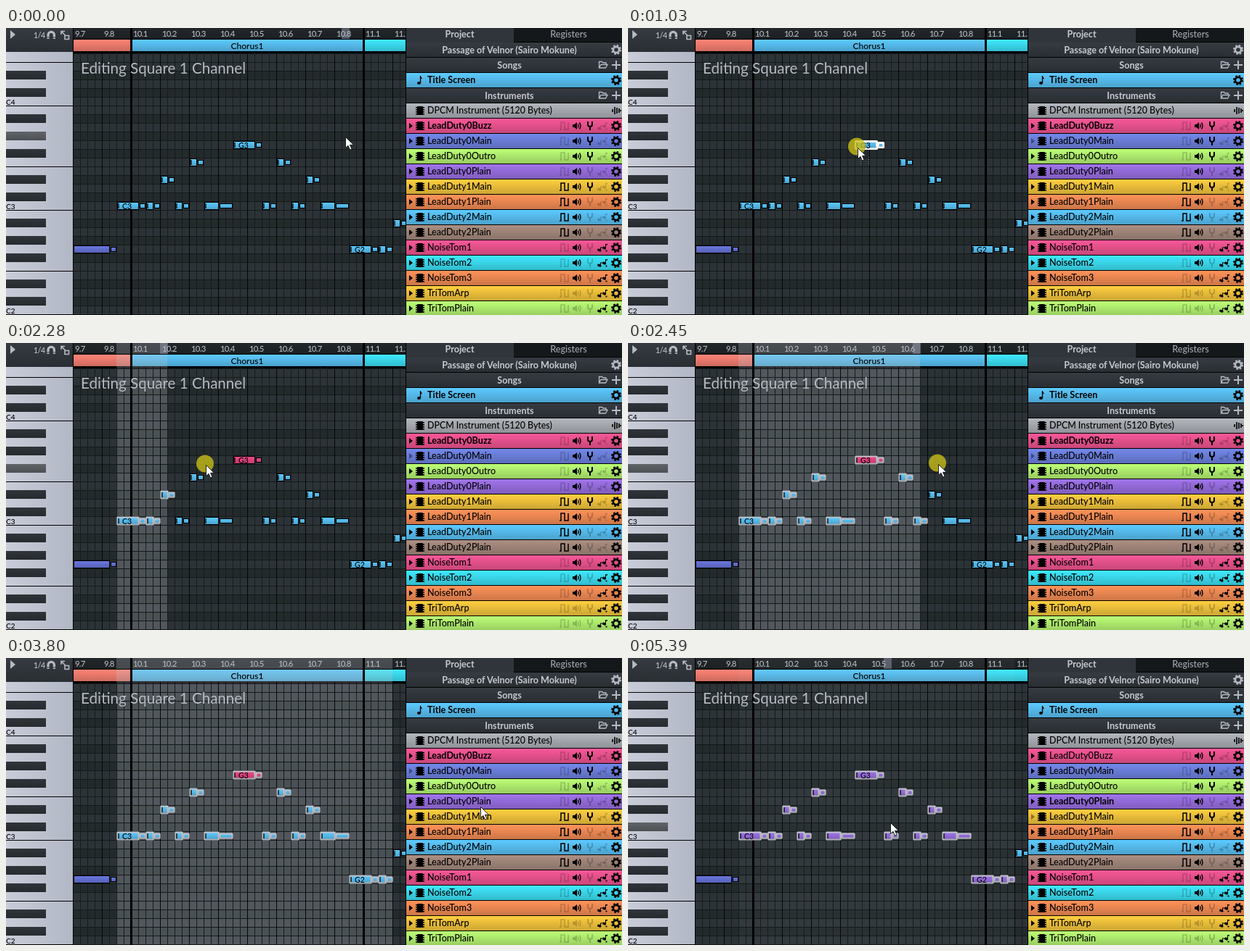
Write an HTML page that moves like this. It is 848 by 396 pixels and loops after 5.47 s.

```html
<!DOCTYPE html>
<html lang="en">
<head>
<meta charset="utf-8">
<title>Piano roll instrument drag</title>
<style>
  html, body { margin: 0; width: 100%; height: 100%; overflow: hidden; background: #000; }
  svg { display: block; width: 100vw; height: 100vh; }
  text { font-family: Lato, "Open Sans", sans-serif; font-weight: 500; white-space: pre; }
</style>
</head>
<body>
<svg viewBox="0 0 848 396" xmlns="http://www.w3.org/2000/svg">
  <defs>
    <linearGradient id="shade" x2="0" y2="1"><stop stop-opacity="0"/><stop offset="1" stop-opacity=".2"/></linearGradient>
    <linearGradient id="ivory"><stop stop-color="#c8ccd8"/><stop offset="1" stop-color="#b2b7c5"/></linearGradient>
    <linearGradient id="panel" x2="0" y2="1"><stop stop-color="#363b42"/><stop offset="1" stop-color="#292e33"/></linearGradient>
  </defs>
  <g id="base"></g>
  <g id="under"></g>
  <g id="lines"></g>
  <g id="notes"></g>
  <g id="side"></g>
  <g id="pointer"></g>
</svg>
<script>
const LOOP = 5470, CELL = 10, ROW = 12, LEFT = 92, RIGHT = 550, C3 = 239;
const PINK = '#f95898', INDIGO = '#7388ea', GREEN = '#bdff77', PURPLE = '#a074ec', YELLOW = '#ffcf40',
      ORANGE = '#ff9359', SKY = '#5dcaff', BROWN = '#ac8f82', CYAN = '#3feaff';

const layer = (id, html) => { document.getElementById(id).innerHTML = html; };
const rect = (x, y, w, h, fill, more = '') => `<rect x="${x}" y="${y}" width="${w}" height="${h}" fill="${fill}" ${more}/>`;
const text = (x, y, size, str, fill = '#000', more = '') => `<text x="${x}" y="${y}" font-size="${size}" fill="${fill}" ${more}>${str}</text>`;
const path = (d, fill, more = '') => `<path d="${d}" fill="${fill}" ${more}/>`;
const stroke = (d, color, width) => path(d, 'none', `stroke="${color}" stroke-width="${width}"`);
const at = (x, y, html, alpha = 1) => `<g transform="translate(${x} ${y})" opacity="${alpha}">${html}</g>`;
const shaded = (x, y, w, h, fill) => rect(x, y, w, h, fill) + rect(x, y, w, h, 'url(#shade)');
const range = (a, b, fn) => Array.from({ length: b - a }, (_, i) => fn(a + i)).join('');

// Semitones are counted from C3.
const pitchTop = s => C3 - s * ROW;
const isBlack = s => [1, 3, 6, 8, 10].includes(((s % 12) + 12) % 12);
const pitchAt = y => -Math.floor((y - C3) / ROW);

// Piano roll

function drawBase() {
  let s = rect(0, 0, 848, 396, '#000');
  s += rect(LEFT, 0, 460, 15, '#22272a') + rect(LEFT, 0, 460, 15, 'url(#shade)');
  s += shaded(93, 16, 79, 16, '#ff8476') + shaded(173, 16, 319, 16, SKY) + shaded(493, 16, 58, 16, CYAN);
  s += range(-13, 18, p => rect(LEFT, pitchTop(p), 460, ROW, isBlack(p) ? '#232a2c' : '#2c3337'));
  s += rect(LEFT, 32, 460, 1, '#000') + rect(0, 33, LEFT, 363, 'url(#ivory)');
  layer('base', s);
}

function drawLines() {
  let s = range(-13, 18, p => isBlack(p) ? shaded(0, pitchTop(p), 55, ROW, '#30353a') : '');
  for (const y of [47, 107, 191, 251, 335, 395]) s += rect(0, y, LEFT, 1, '#000');
  [['C4', 106], ['C3', 250], ['C2', 394]].forEach(([n, y]) => s += text(0, y, 10, n));
  s += range(-13, 18, p => rect(LEFT, pitchTop(p), 460, 1, '#14191b'));
  s += range(0, 46, i => rect(LEFT + i * CELL, 33, 1, 363, i % 4 ? '#171c1e' : '#050708'));
  s += rect(LEFT, 0, 1, 396, '#000') + rect(LEFT, 15, 460, 1, '#000');
  s += rect(171, 0, 3, 396, '#000') + rect(491, 0, 3, 396, '#000');
  const beats = ['9.7', '9.8', ...Array.from({ length: 8 }, (_, i) => '10.' + (i + 1)), '11.1', '11.2'];
  beats.forEach((b, i) => s += text(95 + i * 40, 12, 11.4, b, '#b6bac2', 'letter-spacing="-.75"'));
  s += text(332, 29, 12, 'Chorus1', '#000', 'text-anchor="middle"');
  s += text(103, 63, 20.6, 'Editing Square 1 Channel', '#b6bac2', 'font-weight="400" style="font-weight:400"');

  s += rect(0, 0, LEFT, 33, 'url(#panel)');
  s += path('M6 3L13 9L6 15Z', '#b6bac2') + text(38, 14, 10.5, '1/4', '#c0c4ca', 'letter-spacing="-.4"');
  s += stroke('M58 15V9.5a4.2 4.2 0 0 1 8.4 0V15', '#b6bac2', 3.2) + rect(56, 12.4, 12, 1, '#30353a');
  s += stroke('M76 9V4.500H81M76.500 5L82 10.500M81 10.500H86.500V15.500H81Z', '#b6bac2', 1.6);
  layer('lines', s);
}

// x, body width, release width, semitone, label
const NOTES = [
  [93, 50, 10, -5], [153, 30, 10, 0, 'C3'], [193, 10, 10, 0], [213, 10, 10, 3], [233, 10, 10, 0],
  [253, 10, 10, 5], [273, 20, 20, 0], [313, 30, 10, 7, 'G3'], [353, 10, 10, 0], [373, 10, 10, 5],
  [393, 10, 10, 0], [413, 10, 10, 3], [433, 20, 20, 0], [473, 30, 10, -5, 'G2'], [513, 10, 10, -5], [533, 10, 10, -2]
];

function note([x, w, rel, pitch, label], color, edge, thick) {
  const y = pitchTop(pitch) + 1, rx = x + w + 1, rw = rel - 2;
  const line = edge ? `stroke="${edge}" stroke-width="${thick}" stroke-linejoin="round"` : 'stroke="#000"';
  const box = (bx, by, bw, bh) => rect(bx, by, bw, bh, color, line) + rect(bx, by, bw, bh, 'url(#shade)');
  let s = box(rx + .5, y + 2.5, rw - 1, 6) + box(x + .5, y + .5, w - 1, 10);
  if (x > 100) s += rect(x + 1, y + 2, 2, 7, '#000', 'opacity=".65"');
  return s + (label ? text(x + 7, y + 9.5, 10.5, label) : '');
}

// Side panel

const gear = c => `<circle r="4.1" fill="none" stroke="${c}" stroke-width="2.6"/>
  <circle r="5.7" fill="none" stroke="${c}" stroke-width="2.600" stroke-dasharray="2.4 2.077"/>`;
const plus = stroke('M-6 0H6M0 -6V6', '#b6bac2', 2);
const folder = stroke('M-5.500 4V-4.500H-1.500L0 -3H4V-.500M-5.500 4L-3 -.500H6L3.500 4Z', '#b6bac2', 1.3);
const chip = rect(-4, -6, 8, 12, '#000', 'rx="1"') + range(0, 4, i => rect(-6, -5 + i * 3, 12, 1.6, '#000'));
const ICONS = [
  [768, stroke('M-6 5H-4V-5H1V5H6V-5', '#000', 1.5)],
  [786, path('M-6 -2H-3.500L0 -5V5L-3.500 2H-6Z', '#000') + stroke('M1.500 -2.500Q3 0 1.500 2.500M3.500 -4.500Q6.500 0 3.500 4.500', '#000', 1.4)],
  [804, stroke('M-3 -6V-2Q-3 1 0 1Q3 1 3 -2V-6M0 1V6', '#000', 2)],
  [822, path('M-6 5a2 1.700 0 1 1 2 -1.500V-.500H-1V.500H-3V4ZM1 2a2 1.700 0 1 1 2 -1.500V-5H6V-3.500H4V1Z', '#000')
        + `<circle cx="-4.200" cy="4" r="1.8"/><circle cx="2.300" cy="1" r="1.8"/><circle cx="4.500" cy="4.500" r="1.1"/>`]
];
// name, colour, which of the four icons are lit
const INSTRUMENTS = [
  ['LeadDuty0Buzz', PINK, '0110'], ['LeadDuty0Main', INDIGO, '0110'], ['LeadDuty0Outro', GREEN, '0110'],
  ['LeadDuty0Plain', PURPLE, '0100'], ['LeadDuty1Main', YELLOW, '1110'], ['LeadDuty1Plain', ORANGE, '1100'],
  ['LeadDuty2Main', SKY, '1100'], ['LeadDuty2Plain', BROWN, '1100'], ['NoiseTom1', PINK, '0101'],
  ['NoiseTom2', CYAN, '0101'], ['NoiseTom3', ORANGE, '0101'], ['TriTomArp', YELLOW, '0001'], ['TriTomPlain', GREEN, '0001']
];

function drawSide(chosen, faded) {
  const bold = 'style="font-weight:700"', mid = 'text-anchor="middle"', grey = '#c6cad0';
  const head = (y, str) => rect(551, y, 297, 20, 'url(#panel)') + text(693, y + 14.5, 12.6, str, grey, `${mid} ${bold}`);
  let s = rect(550, 0, 298, 396, '#000') + rect(551, 0, 148, 20, '#30353b') + rect(699, 0, 149, 19, '#14181b');
  s += text(624.5, 13, 12.6, 'Project', grey, `${mid} ${bold}`) + text(774.5, 13, 12.6, 'Registers', '#a4a8b0', mid);
  s += head(20, 'Passage of Velnor (Sairo Mokune)') + at(840, 30, gear('#b6bac2'));
  s += head(41, 'Songs') + head(83, 'Instruments');
  for (const y of [51, 93]) s += at(822, y, folder) + at(840, y, plus);
  s += shaded(551, 62, 297, 20, SKY) + text(580, 76.3, 12.6, 'Title Screen', '#000', bold);
  s += at(570, 72, '<ellipse cx="-1.500" cy="4" rx="2.500" ry="2"/>' + stroke('M.5 4V-6Q1 -3 2.500 -2', '#000', 1.3)) + at(840, 72, gear('#000'));
  s += shaded(551, 104, 297, 20, '#b3b7be') + at(570, 114, chip) + text(580, 118.3, 12.4, 'DPCM Instrument (5120 Bytes)');
  s += at(840, 114, stroke('M-5 -2V2M-2 -5V5M1 -4V4M4 -3V3M6 -1V1', '#000', 1.6));
  INSTRUMENTS.forEach(([name, color, lit], i) => {
    const y = 125 + i * 21, c = y + 10;
    s += shaded(551, y, 297, 20, color) + at(557, c, path('M-2 -4L3 0L-2 4Z', '#000'), i === faded ? .4 : 1);
    s += at(570, c, chip) + text(580, y + 14.3, 12.6, name, '#000', i === chosen ? bold : '');
    ICONS.forEach(([x, icon], k) => s += at(x, c, icon, +lit[k] ? 1 : .2));
    s += at(840, c, gear('#000'));
  });
  layer('side', s);
}

// Pointer motion

const MOVE = 0, DRAG = 1, SELECT = 2, DROP = 3, REST = 4;
const smooth = p => p * p * (3 - 2 * p);
const flick = p => 1 - (1 - p) ** 2.75;
const even = p => p;
// start, end, steps, from x y, to x y, mode, easing
const MOTION = [
  [0, 0, 1, 467, 150, 467, 150, MOVE, even],
  [70, 540, 7, 467, 150, 607, 136, MOVE, smooth],
  [630, 1030, 6, 607, 136, 316, 165, DRAG, smooth],
  [1260, 1740, 7, 316, 165, 153, 165, MOVE, smooth],
  [1820, 2130, 5, 153, 165, 156, 168, MOVE, even],
  [2280, 2770, 7, 156, 169.5, 501, 166.5, SELECT, flick],
  [2850, 3010, 3, 501, 166, 525, 163, SELECT, even],
  [3320, 3800, 7, 525, 163, 653, 205, MOVE, smooth],
  [3880, 4370, 7, 651, 200, 361, 229, DRAG, smooth],
  [4460, 4460, 1, 361, 229, 361, 229, DROP, even],
  [4540, 4540, 1, 361, 229, 361, 229, REST, even],
  [4760, 4840, 2, 361, 229, 361, 229, MOVE, even],
  [5390, 5390, 1, 361, 229, 361, 227, MOVE, even]
];

function pointerAt(t) {
  const i = MOTION.findLastIndex(m => t >= m[0]);
  const [a, b, n, x0, y0, x1, y1, mode, ease] = MOTION[i];
  const step = n > 1 ? Math.min(n - 1, Math.floor((t - a + 6) / (b - a) * (n - 1))) : 0;
  const place = k => { const p = ease(k / n); return [x0 + (x1 - x0) * p, y0 + (y1 - y0) * p]; };
  const [x, y] = place(step + 1), [px, py] = place(step);
  // The editor trails slightly behind the pointer.
  return { key: i + ':' + step, x, y, mode, ux: px + (x - px) * .55, uy: mode === SELECT ? py + (y - py) * .55 : y };
}

const cellAt = x => LEFT + Math.floor((x - LEFT) / CELL) * CELL;

function render(t, p) {
  const hover = (p.mode === MOVE || p.mode === SELECT) && p.x < RIGHT && p.x > LEFT;
  const cellX = p.mode === SELECT ? (t >= 3010 ? p.x : p.ux) : p.x;
  const end = t < 2280 ? 0 : t >= 3010 ? 532 : cellAt(cellX) + CELL;
  const key = pitchAt(p.uy), top = pitchTop(key);

  let under = '';
  if (end) under += rect(152, 0, end - 152, 396, '#c0c4cc', `opacity="${t < 3880 ? .25 : .045}"`);
  if (hover) {
    under += rect(cellAt(cellX), 0, CELL + 1, 15, '#aab2c8', 'opacity=".4"');
    if (!isBlack(key)) {
      const a = top - (isBlack(key + 1) ? 6 : 0), b = top + ROW + (isBlack(key - 1) ? 6 : 0);
      under += rect(0, a, LEFT, b - a, '#a0a2aa');
    }
  }
  layer('under', under);

  let s = hover && isBlack(key) ? shaded(0, top, 55, ROW, '#606468') : '';
  for (const n of NOTES) {
    const picked = n[0] > 152 && n[0] < end, lead = n[4] === 'G3';
    const target = lead && t < 1260 && p.mode === DRAG && p.x < 352;
    const color = picked && t >= 4460 ? PURPLE : lead && t >= 1260 ? '#f04a88' : n[0] === 93 ? '#6a78e0' : SKY;
    s += note(n, color, target ? '#fff' : picked ? '#c3c6cd' : '', target ? 3 : 2.2);
  }
  layer('notes', s);
  drawSide(t < 3880 ? 0 : 3, t < 630 ? -1 : t < 3880 ? 1 : 4);

  let c = '';
  if ([DRAG, SELECT, DROP].includes(p.mode)) c += '<circle cx="-1" cy="-1.500" r="12" fill="#c8bd18" opacity=".8"/>';
  if (p.mode === DRAG) c += path('M4.500 13V25M15.500 13V25', 'none', 'stroke="#8a8e90" stroke-dasharray="1 2"');
  c += path('M.5 .5V15.500L4 12.300L6.500 18L9 17L6.500 11.300H11.500Z', '#fff', 'stroke="#111" stroke-width=".9"');
  layer('pointer', at(Math.round(p.x), Math.round(p.y), c));
}

drawBase();
drawLines();
let shown = '';
const began = performance.now();
function tick() {
  const t = Math.max(0, performance.now() - began) % LOOP, p = pointerAt(t);
  if (p.key !== shown) render(t, p);
  shown = p.key;
  requestAnimationFrame(tick);
}
tick();
</script>
</body>
</html>
```
